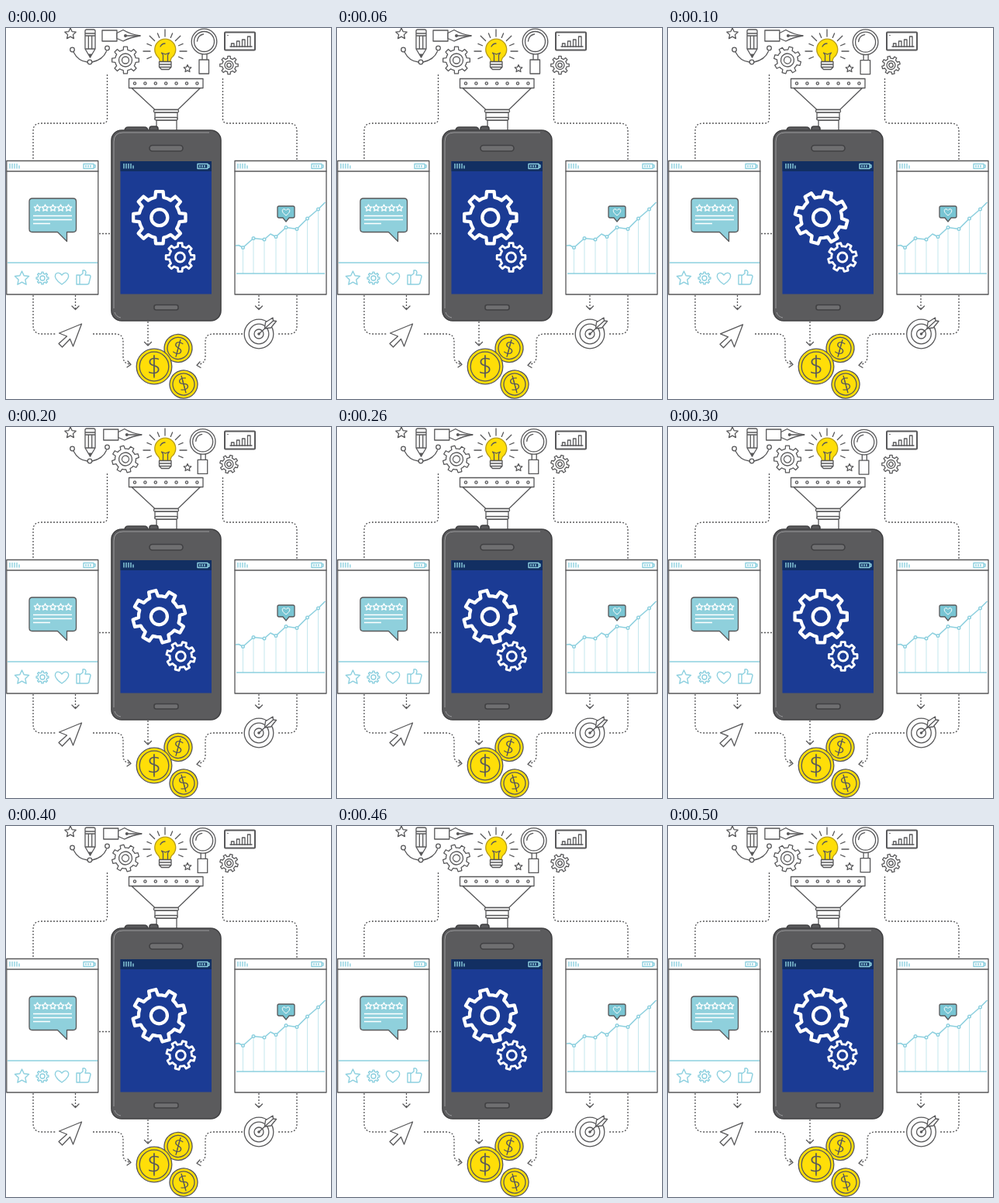
Recreate the animation shown at these times as an HTML page. Size 419 px wide and 479 px high, loop 0.6 s.

```html
<!DOCTYPE html>
<html lang="en">
<head>
<meta charset="utf-8">
<title>App funnel</title>
<style>
  html, body { margin: 0; width: 100%; height: 100%; overflow: hidden; background: #fff; }
  svg { display: block; width: 419px; height: 479px; }
  .ink { fill: none; stroke: #58585a; stroke-width: 1.3; stroke-linejoin: round; stroke-linecap: round; }
  .paper { fill: #fff; }
  .dark { fill: #58585a; stroke: none; }
  .dash { stroke-dasharray: 2 2; stroke-linecap: butt; stroke-width: 1.3; }
  .sky { fill: none; stroke: #8dd0df; stroke-width: 1.4; stroke-linejoin: round; }
  .white { fill: none; stroke: #fff; stroke-linejoin: round; }
  .coin { fill: #ffde08; }
  text { font-family: "Open Sans", "Liberation Sans", sans-serif; font-weight: 300; fill: #58585a; text-anchor: middle; }
</style>
</head>
<body>
<svg viewBox="0 0 419 479">
  <!-- connectors -->
  <g class="ink">
    <path class="dash" d="M130.500 60V117q0 6-6 6H45q-10 0-10 10V171M279.500 65V117q0 6 6 6H365q10 0 10 10V171M120 265.500H136"/>
    <path class="dash" d="M35 345V384q0 11 11 11H64M112 395H141q10 0 10 10V424q0 9 8 10M375 345V385q0 10-10 10H350M305 395H267q-10 0-10 10V424q0 9-8 10"/>
    <path class="dash" d="M89.500 345V363M326 345V363M183 379V409"/>
    <path d="M85 359l4.500 4.500 4.500-4.500M321.500 359l4.500 4.500 4.500-4.500M178.500 405.500l4.500 4.500 4.500-4.500M157 430l4 4.500-5 3.500M250 431l-4 4.500 5 3"/>
  </g>

  <!-- fixed drawing tools -->
  <g class="ink">
    <path id="starA"/>
    <path d="M87 31Q93 43 105 44M111 44Q125 41 129.500 30"/>
    <g class="paper">
      <circle cx="85.500" cy="28" r="2.800"/><circle cx="108" cy="44" r="2.800"/><circle cx="130.500" cy="26" r="2.800"/>
      <path d="M102 4q0-2 2-2h9q2 0 2 2V27l-6.500 11L102 27ZM102 7h13M102 10h13M106.300 10V27M110.700 10V27M102 27h13"/>
    </g>
    <path class="dark" d="M106 33.500h5L108.500 39Z"/>
  </g>

  <!-- pen nib -->
  <g id="pen" class="ink paper">
    <rect x="124" y="3" width="19" height="14"/>
    <path d="M143 6.500L151 2.500Q160 8 173 10Q160 12 151 17L143 13.500Z"/>
    <path d="M155 10H173"/><circle class="dark" cx="154" cy="10" r="2"/>
  </g>

  <g id="cogA" class="ink"><path/><circle r="8.500"/><circle r="4.500"/></g>
  <g id="cogB" class="ink"><path/><circle r="5.500"/><circle r="2.700"/></g>

  <!-- light bulb -->
  <g class="ink">
    <path id="rays"/>
    <path class="coin" stroke="#b59b1c" d="M198.500 43.500Q198 39 195 36.500A13.500 13.500 0 1 1 215.500 36.500Q212 39 212 43.500Z"/>
    <path d="M202.500 43V35l-2-3 5 2 5-2-2 3V43M199 24q2-4 6-4"/>
    <path class="paper" d="M197.500 43.500h15.500v7l-3 3h-9.500l-3-3ZM197.500 47h15.500M197.500 50.500h15.500"/>
    <path id="starB"/>
  </g>

  <!-- magnifier -->
  <g id="lens" class="ink paper">
    <path d="M253 33h6v9h-6Z"/><rect x="249" y="41" width="12.500" height="18"/>
    <circle cx="255.500" cy="17.500" r="16.300"/><circle cx="255.500" cy="17.500" r="13"/>
    <path fill="none" d="M246.500 17q1-8 8-9"/>
  </g>

  <g class="ink">
    <rect x="282" y="5.500" width="39" height="23" rx="1" stroke-width="2"/>
    <path d="M289 24H317"/>
    <path d="M290.500 24v-4h3.500v4M297.500 24v-7h3.500v7M304.500 24v-9h3.500v9M311.500 24v-13h3.500v13"/>
    <circle class="dark" cx="286" cy="9.500" r=".8"/>
  </g>

  <!-- funnel -->
  <g class="ink paper">
    <path d="M162 77.500L192 105.500H221.500L250.500 77.500Z"/>
    <rect x="158.500" y="65.500" width="95.500" height="12"/>
    <path d="M194 119h26v14h-26ZM192 109h29v9h-29Z"/>
    <rect x="190.500" y="105.500" width="32" height="3.500" rx="1.500"/>
    <rect x="192" y="115.500" width="29" height="3.500" rx="1.500"/>
    <g id="rivets"></g>
  </g>

  <!-- phone -->
  <g stroke="#414143" stroke-width="1.600" fill="#5b5b5d">
    <path d="M153 133q0-5 5-5h20q5 0 5 5ZM185 133v-3q0-3 3-3h5q3 0 3 3v3Z"/>
    <rect x="136" y="132" width="141" height="246" rx="13"/>
    <path fill="none" stroke="#9a9a9c" stroke-width="1" d="M139 362V147q0-12 12-12H262M140 367q2 6 8 7"/>
    <rect x="185" y="151.500" width="43" height="7.500" rx="3.700" fill="#6f6f71"/>
    <rect x="191" y="357.500" width="31" height="6.500" rx="2.500" fill="#6f6f71"/>
    <path stroke="none" fill="#1b3b94" d="M147.500 172H265V343.500H147.500Z"/>
    <path stroke="none" fill="#122f62" d="M147.500 172H265V185H147.500Z"/>
  </g>
  <g id="big" class="white" stroke-width="4.300"><path/><circle r="10.500"/></g>
  <g id="small" class="white" stroke-width="2.800"><path/><circle r="6"/></g>

  <!-- side panels -->
  <g class="ink paper">
    <rect x=".8" y="171.500" width="118" height="172.500"/>
    <rect x="295" y="171.500" width="118" height="172.500"/>
    <path d="M1 185H119M295 185H413"/>
  </g>
  <g id="status" class="sky"></g>

  <!-- review card -->
  <path class="ink" style="fill:#8fd0dc" d="M34 220H86.500q4 0 4 4V259.500q0 4-4 4H78.500V275.500L66.500 263.500H34q-4 0-4-4V224q0-4 4-4Z"/>
  <g class="white">
    <path id="rating" stroke-width="1.300"/>
    <path stroke-width="1.400" d="M35 242.500H85M35 247.500H85M35 252.500H57"/>
  </g>
  <g class="sky">
    <path d="M2 303H118"/>
    <path id="starC"/>
    <g id="cogC"><path/><circle r="3"/></g>
    <path d="M72 331C56 321 66 311 72 319C78 311 88 321 72 331Z"/>
    <path d="M91 319h4v12h-4ZM95 320l4-3v-4q4-1 4 3l-1 3h5q2 0 2 2l-2 8q0 2-3 2h-9"/>
  </g>

  <!-- chart -->
  <g class="sky">
    <path d="M297 317H411"/>
    <path id="drops" stroke-width=".8" opacity=".65"/>
    <path id="trend" stroke-width="1.600"/>
    <g id="dots" fill="#fff"></g>
  </g>
  <path class="ink" style="fill:#78c5d3" d="M352 230H370q2 0 2 2V243q0 2-2 2H365L361 250L357 245H352q-2 0-2-2V232q0-2 2-2Z"/>
  <path class="white" d="M361 242C352 236 358 231 361 235.500C364 231 370 236 361 242Z"/>

  <!-- pointer and target -->
  <path id="plane" class="ink paper" d="M97.500 382L68.500 394L78.500 398L68 407.500L72.500 412L82.500 401.500L86.500 411Z"/>
  <g id="target" class="ink paper">
    <circle cx="326" cy="395" r="18.800"/><circle cx="326" cy="395" r="12.800"/>
    <circle cx="326" cy="395" r="6"/><circle class="dark" cx="326" cy="395" r="1.800"/>
    <path d="M333.500 388L334.500 380L344 374L344.500 378L348.500 378.500L341.500 387Z"/>
    <path d="M326 395L344.500 378"/>
  </g>

  <g id="coins" class="ink"></g>
</svg>
<script>
const $ = id => document.getElementById(id);
const polar = (r, deg) => {
  const a = deg * Math.PI / 180;
  return [r * Math.sin(a), -r * Math.cos(a)];
};
const poly = pts => "M" + pts.map(p => p.map(v => v.toFixed(2)).join(" ")).join("L") + "Z";

function gearPath(outer, inner) {
  const pts = [];
  for (let a = 0; a < 360; a += 45) {
    pts.push(polar(inner, a - 12), polar(outer, a - 8), polar(outer, a + 8), polar(inner, a + 12), polar(inner, a + 22.5));
  }
  return poly(pts);
}

function starPath(x, y, r) {
  const pts = [];
  for (let i = 0; i < 10; i++) {
    const [dx, dy] = polar(i % 2 ? r * 0.48 : r, i * 36);
    pts.push([x + dx, y + dy]);
  }
  return poly(pts);
}

const setPath = (id, d) => $(id).setAttribute("d", d);
setPath("starA", starPath(83, 7.5, 7.5));
setPath("starB", starPath(234, 52.5, 5));
setPath("starC", starPath(20.5, 323.5, 9.5));
setPath("rating", [40, 50, 60, 70, 80].map(x => starPath(x + 0.5, 232.5, 4.5)).join(""));

// id: [centre x, centre y, outer radius, inner radius]
const gears = {
  big: [197.8, 244.7, 34, 26.5], small: [224.5, 296, 18.5, 14.2],
  cogA: [154, 41.5, 17.5, 13.5], cogB: [287.5, 48, 11.8, 8.8], cogC: [47, 323, 8, 6]
};
for (const id in gears) {
  const [x, y, outer, inner] = gears[id];
  $(id).firstElementChild.setAttribute("d", gearPath(outer, inner));
  $(id).setAttribute("transform", `translate(${x} ${y})`);
}

let rays = "";
for (let i = -5; i <= 5; i++) {
  const [x1, y1] = polar(19, i * 22.5), [x2, y2] = polar(i % 2 ? 25 : 28, i * 22.5);
  rays += `M${205 + x1} ${30 + y1}L${205 + x2} ${30 + y2}`;
}
setPath("rays", rays);

for (let i = 0; i < 7; i++) {
  $("rivets").innerHTML += `<circle cx="${166 + i * 13.4}" cy="71.5" r="1.6"/>`;
}

$("status").innerHTML = [5, 152, 299].map(x => {
  let bars = "";
  for (let i = 0; i < 5; i++) bars += `M${x + i * 3} 181.500v${i < 4 ? -6.5 : -4}`;
  const b = x + 95;
  return `<path d="${bars}M${b} 175.500h13v6h-13ZM${b + 13} 177h2v3h-2M${b + 3} 177v3M${b + 6} 177v3M${b + 9} 177v3"/>`;
}).join("");

const trend = [[296, 281], [300, 280.5], [305.5, 283.5], [319, 271.5], [333, 273], [341, 266],
  [348, 269.5], [361, 257.5], [375, 259.5], [388.5, 246], [402.5, 234], [411.5, 225]];
setPath("trend", "M" + trend.join("L"));
const marks = trend.filter((p, i) => ![0, 1, 5, 11].includes(i));
setPath("drops", marks.map(([x, y]) => `M${x} ${y}V317`).join(""));
$("dots").innerHTML = marks.map(([x, y]) => `<circle cx="${x}" cy="${y}" r="1.8"/>`).join("");

$("coins").innerHTML = [[222, 413.5, 18, 15], [191, 437, 22.8, 0], [229, 460, 18, -15]].map(([x, y, r, tilt]) =>
  `<g transform="translate(${x} ${y}) rotate(${tilt})"><circle class="coin" r="${r}"/><circle r="${r - 4}"/>
  <text stroke="none" y="${r * 0.5}" font-size="${r * 1.45}">$</text><path d="M0 ${-r * 0.63}V${r * 0.63}"/></g>`).join("");

const move = (id, x, y) => $(id).setAttribute("transform", `translate(${x} ${y})`);
function turn(id, deg, dx = 0) {
  const [x, y] = gears[id];
  $(id).setAttribute("transform", `translate(${x + dx} ${y}) rotate(${deg})`);
}

// The artwork steps forward and back on a 100 ms beat.
function draw() {
  const beat = Math.floor(performance.now() / 100) % 6;
  const k = 3 - Math.abs(3 - beat);
  const odd = k % 2;
  turn("big", 15 * k, -0.2 * k);
  turn("small", -15 * k, 0.4 * k);
  turn("cogA", 15 * k);
  turn("cogB", -15 * k);
  move("pen", k * 0.9, 0);
  move("lens", -0.9 * k, 0.7 * k);
  move("plane", -odd, odd * 0.8);
  move("target", odd * 0.5, 0);
  requestAnimationFrame(draw);
}
draw();
</script>
</body>
</html>
```
